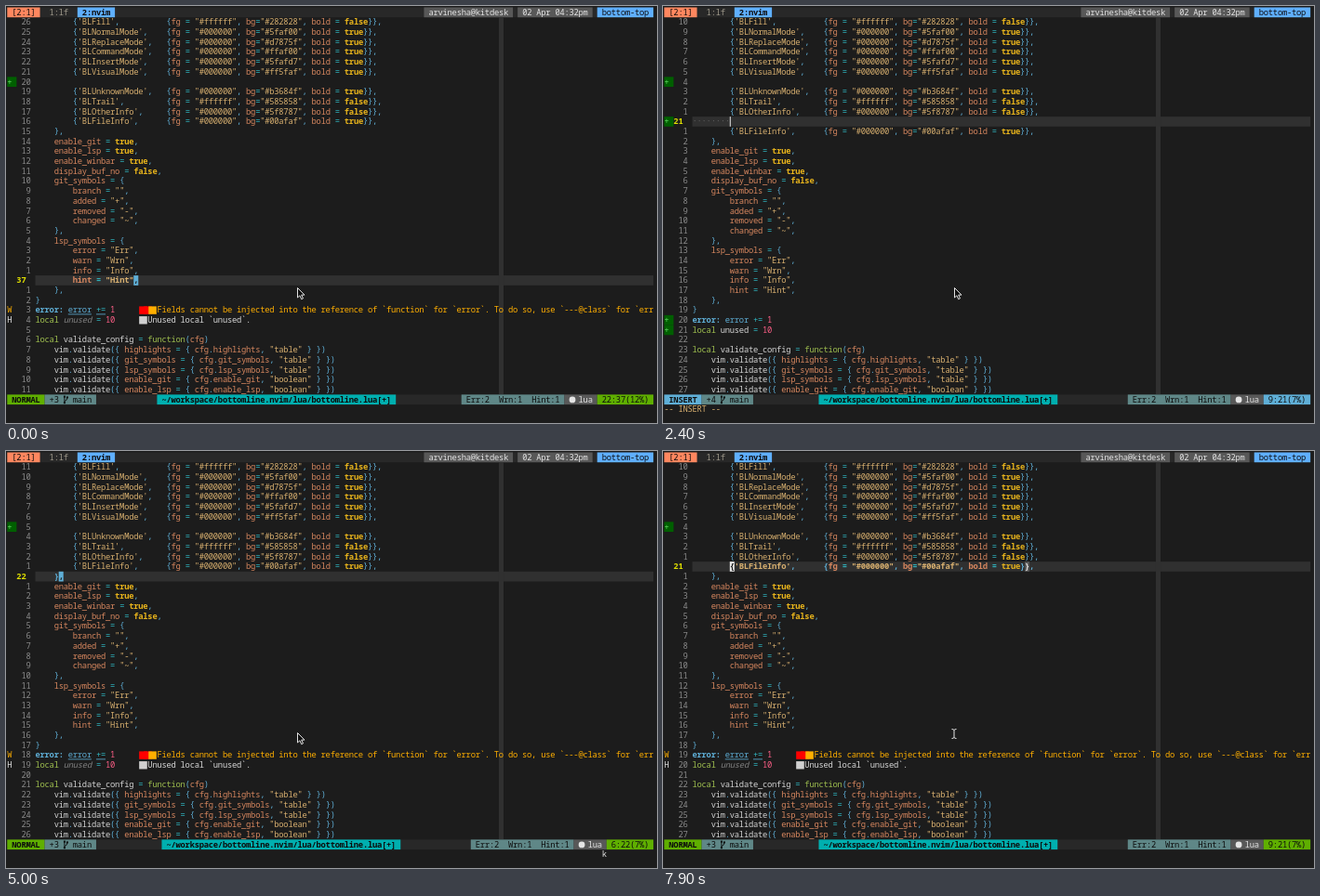
These frames come from a looping animation (700x449 px, 8 s). An HTML page with a canvas:

```html
<!DOCTYPE html>
<html lang="en">
<head>
<meta charset="utf-8">
<title>Terminal editor session</title>
<style>
  html, body { margin: 0; width: 100%; height: 100%; overflow: hidden; background: #1c1c1c; }
  canvas { display: block; }
</style>
</head>
<body>
<canvas id="stage" width="700" height="449"></canvas>
<script>
const ctx = document.getElementById('stage').getContext('2d');
const LOOP = 8000;

// Terminal grid
const CW = 5.035, RH = 10.69, LEFT = 1.3, TOP = 1.5;
const COLS = 138, GUTTER = 6, ROWS = 38, FIRST_LINE = 11, TOTAL_LINES = 298;
const FONT_SIZE = 8.8;

const C = {
  bg: '#1c1c1c', fill: '#282828', raised: '#303030', grey: '#585858', black: '#0c0c0c',
  light: '#e4e4e4', number: '#8a8a8a', current: '#e0e000', string: '#d7af6f',
  ident: '#d7875f', punct: '#5fafd7', operator: '#2fb5c0', bool: '#e8b41c', keyword: '#9fbf4f',
  digit: '#ff5f87', name: '#d4d4d4',
  teal: '#5f8787', file: '#00afaf', normal: '#5faf00', insert: '#5fafd7', warn: '#ffaf00'
};

const highlight = ([name, fg, bg, bold]) =>
  `        {'BL${name}',`.padEnd(28) + `{fg = "#${fg}", bg="#${bg}", bold = ${bold}}},`;
const check = ([name, type]) => `    vim.validate({ ${name} = { cfg.${name}, "${type}" } })`;

const SOURCE = [
  ...[['Fill', 'ffffff', '282828', false], ['NormalMode', '000000', '5faf00', true],
    ['ReplaceMode', '000000', 'd7875f', true], ['CommandMode', '000000', 'ffaf00', true],
    ['InsertMode', '000000', '5fafd7', true], ['VisualMode', '000000', 'ff5faf', true]].map(highlight),
  '',
  ...[['UnknownMode', '000000', 'b3684f', true], ['Trail', 'ffffff', '585858', false],
    ['OtherInfo', '000000', '5f8787', false], ['FileInfo', '000000', '00afaf', true]].map(highlight),
  '    },',
  '    enable_git = true,', '    enable_lsp = true,', '    enable_winbar = true,',
  '    display_buf_no = false,',
  '    git_symbols = {',
  '        branch = "",', '        added = "+",', '        removed = "-",', '        changed = "~",',
  '    },',
  '    lsp_symbols = {',
  '        error = "Err",', '        warn = "Wrn",', '        info = "Info",', '        hint = "Hint",',
  '    },',
  '}',
  'error: error += 1', 'local unused = 10', '',
  'local validate_config = function(cfg)',
  ...[['highlights', 'table'], ['git_symbols', 'table'], ['lsp_symbols', 'table'],
    ['enable_git', 'boolean'], ['enable_lsp', 'boolean']].map(check)
];
const NEW_ROW = 10, EDITED_ROW = 6;

// Cursor: [time, line, column, pending keys]
const MOVES = [
  [0, 37, 21], [300, 37, 21, '1'], [400, 37, 21, '17'], [500, 20, 21],
  [600, 20, 28], [700, 20, 32], [800, 20, 36], [900, 20, 42], [1000, 20, 47], [1100, 20, 50], [1200, 20, 56],
  [1700, 21, 8], [2800, 21, 0], [3100, 22, 7], [3400, 23, 5],
  [3900, 22, 7], [4100, 21, 0], [4200, 21, 0, 'd'], [4300, 21, 8], [4600, 22, 5],
  [5000, 22, 5, 'k'], [5100, 21, 8], [5300, 20, 8], [5500, 19, 8], [6600, 20, 8], [6900, 21, 8]
];
const INSERT = [1700, 2800], EXTRA_LINE = [1700, 4300], IBEAM_AT = 7300;
const within = (t, [from, to]) => t >= from && t < to;

const colX = col => LEFT + col * CW;
const rowY = row => TOP + row * RH;

function box(col, row, width, color) {
  ctx.fillStyle = color;
  ctx.fillRect(colX(col), rowY(row), width * CW, RH);
}

function text(str, col, row, color, style = '') {
  ctx.font = `${style} ${FONT_SIZE}px "Noto Sans Mono", monospace`;
  ctx.fillStyle = color;
  ctx.fillText(str, colX(col), rowY(row) + 8.2);
}

// Text on a coloured background; returns the column after it
function segment(str, col, row, bg, fg = C.black, style = '') {
  box(col, row, str.length, bg);
  text(str, col, row, fg, style);
  return col + str.length;
}

const TOKENS = [
  [/^error:/, C.punct, true],
  [/"[^"]*"|'[^']*'/, C.string],
  [/\b(?:true|false)\b/, C.bool, true],
  [/\b(?:local|function)\b/, C.keyword],
  [/\b(?:vim|validate\w*|unused)\b/, C.name],
  [/\b\d+\b/, C.digit],
  [/\w+/, C.ident],
  [/\+?=/, C.operator],
  [/[^\s\w"'=+]+/, C.punct]
];
const TOKEN = new RegExp(TOKENS.map(([rule]) => `(${rule.source})`).join('|'), 'g');

function tokenize(line) {
  return [...line.matchAll(TOKEN)].map(m => {
    const [, color, bold] = TOKENS[m.slice(1).findIndex(Boolean)];
    const label = color === C.ident && line.startsWith('error:');
    return { str: m[0], at: m.index, color: label ? C.punct : color, bold };
  });
}

function drawTopBar() {
  box(0, 0, COLS, C.fill);
  segment(' [2:1] ', 0, 0, '#ff875f');
  text('1:lf', 9, 0, '#a09a8c');
  segment(' 2:nvim ', 15, 0, '#5fafff', C.black, 'bold');
  segment(' arvinesha@kitdesk ', 89, 0, C.grey, C.light);
  segment(' 02 Apr 04:32pm ', 109, 0, C.grey, C.light);
  segment(' bottom-top ', 126, 0, '#5fafff');
}

function drawLine(line, row, isCurrent, diagnostics) {
  for (const { str, at, color, bold } of tokenize(line)) {
    const dim = diagnostics && str === 'unused';
    text(str, GUTTER + at, row, dim ? '#808080' : color, dim ? 'italic' : bold || isCurrent ? 'bold' : '');
  }
}

function drawSign(row, sign) {
  if (sign === '+') segment('+ ', 0, row, '#005f00', '#5fd75f');
  else text(sign, 0, row, sign === 'W' ? C.warn : C.light);
}

function square(col, row, color) {
  ctx.fillStyle = color;
  ctx.fillRect(colX(col) + 0.9, rowY(row) + 1.2, 8.6, 8.4);
}

function drawDiagnostics(row) {
  const message = 'Fields cannot be injected into the reference of `function` for `error`. ' +
    'To do so, use `---@class` for `error`.';
  ctx.fillStyle = C.punct;
  for (const [at, len] of [[7, 5], [13, 2]]) {
    ctx.fillRect(colX(GUTTER + at), rowY(row) + 9.3, len * CW, 0.8);
  }
  square(28, row, '#ff0000');
  square(29, row, '#ff0000');
  square(30, row, C.warn);
  text(message.slice(0, COLS - 32), 32, row, C.warn);
  square(28, row + 1, '#d0d0d0');
  text('Unused local `unused`.', 30, row + 1, '#d7d7d7');
}

function drawCursor(line, col, row, inserting) {
  const at = GUTTER + col;
  if (inserting) {
    ctx.fillStyle = C.light;
    ctx.fillRect(colX(at), rowY(row), 1, RH);
    return;
  }
  const char = line[col] || ' ';
  const token = tokenize(line).find(k => col >= k.at && col < k.at + k.str.length);
  const opens = char === '{';
  if (opens) segment('}', GUTTER + line.lastIndexOf('}'), row, C.grey, C.light, 'bold');
  segment(char, at, row, opens || !token ? C.light : token.color, C.bg, 'bold');
}

function drawBranch(col, row) {
  const x = colX(col), y = rowY(row);
  ctx.strokeStyle = C.black;
  ctx.lineWidth = 0.9;
  ctx.beginPath();
  ctx.moveTo(x + 1.2, y + 1.8);
  ctx.lineTo(x + 1.2, y + 9);
  ctx.moveTo(x + 1.2, y + 7.2);
  ctx.quadraticCurveTo(x + 4.2, y + 6.4, x + 4.2, y + 3);
  ctx.stroke();
  ctx.fillStyle = C.black;
  for (const [dx, dy] of [[1.2, 2.2], [1.2, 8.8], [4.2, 3]]) {
    ctx.fillRect(x + dx - 1, y + dy - 1, 2, 2);
  }
}

function drawStatus(line, col, inserting, extra) {
  const row = ROWS + 1, accent = inserting ? C.insert : C.normal;
  const position = ` ${col + 1}:${line}(${Math.floor(line / TOTAL_LINES * 100)}%) `;
  const errors = ' Err:2  Wrn:1  Hint:1 ', language = '   lua ';
  const file = ' ~/workspace/bottomline.nvim/lua/bottomline.lua[+] ';
  box(0, row, COLS, C.fill);
  let left = segment(inserting ? ' INSERT ' : ' NORMAL ', 0, row, accent, C.black, 'bold');
  left = segment(extra ? ' +4   main ' : ' +3   main ', left, row, C.teal);
  drawBranch(12, row);
  let right = COLS - (errors + language + position).length;
  segment(file, left + Math.floor((right - left - file.length) / 2), row, C.file, C.black, 'bold');
  right = segment(errors, right, row, C.teal);
  const iconX = colX(right + 1) + 3.5;
  right = segment(language, right, row, C.grey, C.light);
  ctx.fillStyle = C.light;
  ctx.beginPath();
  ctx.arc(iconX, rowY(row) + 5.5, 3.4, 0, 7);
  ctx.fill();
  segment(position, right, row, accent);
}

const ARROW = new Path2D('M313.5 303.5v10.5l2.4-2.2 1.8 3.9 1.8-.8-1.8-3.8h3.3z');
const IBEAM = new Path2D('M310.5 299.5q2.5 0 2.5 1.3q0-1.3 2.5-1.3M313 300.8v7.4M310.5 309.5q2.5 0 2.5-1.3q0 1.3 2.5 1.3');

function drawPointer(t) {
  const ibeam = t >= IBEAM_AT;
  ctx.strokeStyle = C.light;
  ctx.lineWidth = 1;
  ctx.fillStyle = '#111';
  if (!ibeam) ctx.fill(ARROW);
  ctx.stroke(ibeam ? IBEAM : ARROW);
}

function draw(t) {
  const [, cursorLine, col, keys = ''] = MOVES.findLast(move => move[0] <= t);
  const inserting = within(t, INSERT), extra = within(t, EXTRA_LINE);
  const lines = [...SOURCE];
  if (extra) lines.splice(NEW_ROW, 0, '');
  const errorRow = lines.indexOf('error: error += 1');

  ctx.fillStyle = C.bg;
  ctx.fillRect(0, 0, 700, 449);
  ctx.letterSpacing = `${CW - FONT_SIZE * 0.6}px`;
  drawTopBar();

  const cursorRow = cursorLine - FIRST_LINE + 1;
  box(GUTTER, cursorRow, COLS - GUTTER, C.raised);
  ctx.fillStyle = C.raised;
  ctx.fillRect(colX(GUTTER + 99), rowY(1), CW, ROWS * RH);

  lines.slice(0, ROWS).forEach((line, i) => {
    const row = i + 1, distance = Math.abs(row - cursorRow);
    if (distance) text(String(distance).padStart(3), 2, row, C.number);
    else text(String(cursorLine), 2, row, C.current, 'bold');
    drawLine(line, row, !distance, !inserting);
  });

  drawSign(EDITED_ROW + 1, '+');
  if (extra) drawSign(NEW_ROW + 1, '+');
  drawSign(errorRow + 1, inserting ? '+' : 'W');
  drawSign(errorRow + 2, inserting ? '+' : 'H');
  if (inserting) text('·'.repeat(8), GUTTER, cursorRow, '#626262');
  else drawDiagnostics(errorRow + 1);

  drawCursor(lines[cursorLine - FIRST_LINE], col, cursorRow, inserting);
  drawStatus(cursorLine, col, inserting, extra);
  if (inserting) text('-- INSERT --', 0, ROWS + 2, C.string);
  text(keys, 127, ROWS + 2, C.light);
  drawPointer(t);
}

function tick() {
  draw(performance.now() % LOOP);
  requestAnimationFrame(tick);
}
tick();
</script>
</body>
</html>
```
